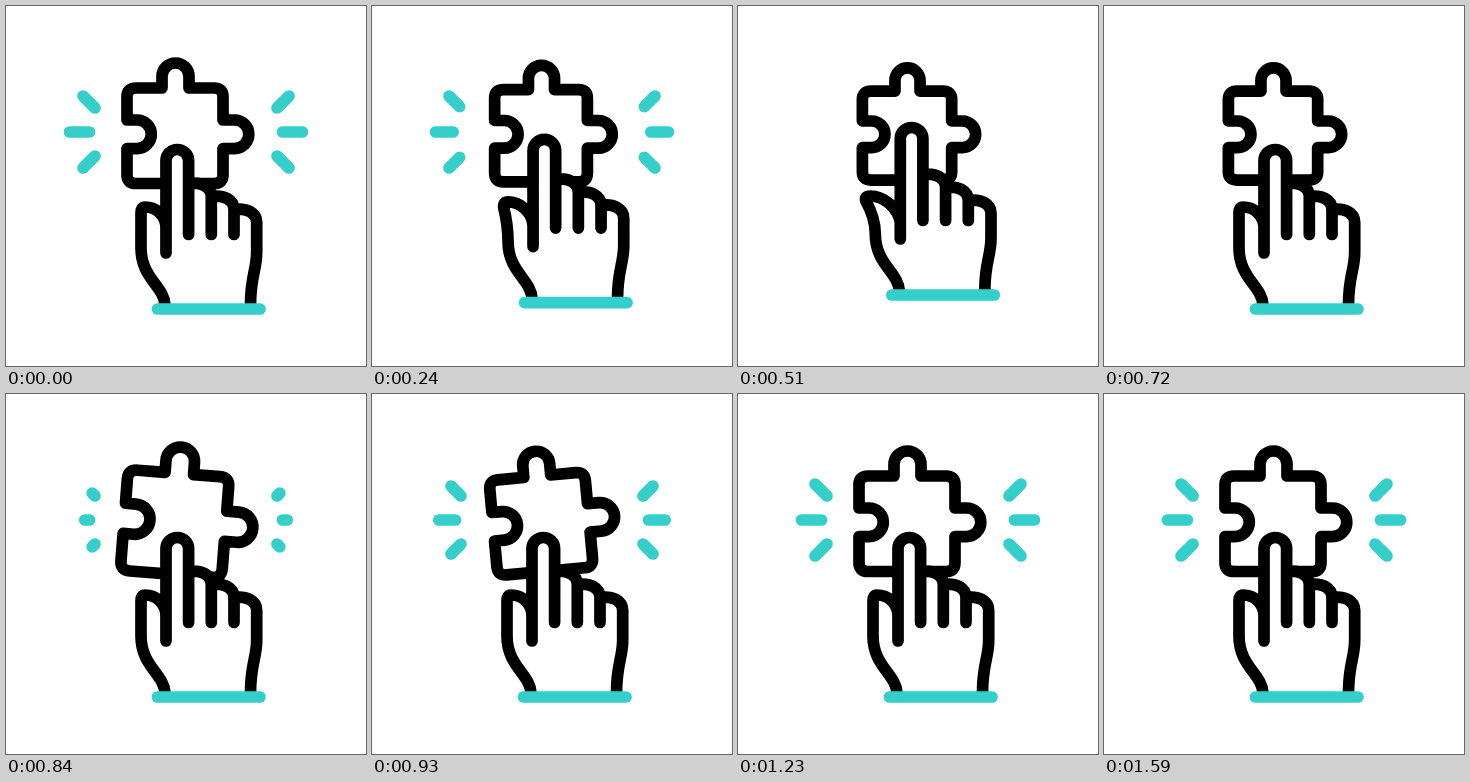
These frames come from a looping animation (360x360 px, 1.62 s). An HTML page:

```html
<!DOCTYPE html>
<html>
<head>
<meta charset="utf-8">
<style>
  html, body { margin: 0; width: 100%; height: 100%; overflow: hidden; background: #fff; }
  svg { display: block; width: 100vw; height: 100vh; }
  path { stroke: #000; stroke-width: 11.7; stroke-linecap: round; stroke-linejoin: round; fill: #fff; }
  .teal { stroke: #35cfcb; }
  #puzzle { vector-effect: non-scaling-stroke; }
</style>
</head>
<body>
<svg viewBox="0 0 360 360">
  <path id="rays" class="teal"/>
  <path id="puzzle" d="M121 91q0-9 9-9H156V70.5a13.5 13.5 0 0 1 27 0V82H208q9 0 9 9V114h11.5a14.3 14.3 0 0 1 0 28.6H217V168.5q0 9-9 9H130q-9 0-9-9V142.6h10a14.3 14.3 0 0 0 0-28.6H121Z"/>
  <g id="arm">
    <path id="hand"/>
    <path class="teal" d="M151.5 303H254"/>
  </g>
</svg>
<script>
const LOOP = 1620;
const el = id => document.getElementById(id);

// Smooth 0 to 1 between two times
function ramp(t, start, end) {
  const p = Math.min(1, Math.max(0, (t - start) / (end - start)));
  return (1 - Math.cos(Math.PI * p)) / 2;
}

// Outline from wrist over thumb, index and knuckles; p stretches the index and spreads the thumb
function handPath(p) {
  const knuckle = 177.5 + 5 * p, step = 22.7, thumb = 201 + 3 * p;
  let outline = `M159 299C158 280 135 272 135 242Q135 226 ${135 - 9.5 * p} ${207 + 2 * p}
    Q${135 - 11 * p} ${thumb} ${139 - 9 * p} ${thumb}
    C${150 - 7 * p} ${thumb} ${160 - 3 * p} ${209 + 6 * p} 160 ${222 + 8 * p}
    V${154.5 - 8 * p}a11.3 11 0 0 1 22.6 0V${knuckle}`;
  let creases = 'M160 222V247';
  for (let i = 0; i < 3; i++) {
    outline += `c12-2 ${step} 3 ${step} 13`;
    creases += `M${182.6 + i * step} ${knuckle + 13 * i}V228.5`;
  }
  return outline + 'V246C250.7 264 244.5 270 244.5 299' + creases;
}

function raysPath(inner, outer) {
  if (outer - inner < 0.01) return '';
  let d = '';
  for (const side of [-1, 1]) {
    for (const dir of [-1, 0, 1]) {
      const at = l => `${180 + side * (dir ? 91 + 12 * l : 96.5 + 20 * l)} ${126 + dir * (24 + 12 * l)}`;
      d += `M${at(inner)}L${at(outer)}`;
    }
  }
  return d;
}

function draw(t) {
  const press = ramp(t, 0, 510) - ramp(t, 540, 710);
  el('arm').setAttribute('transform', `translate(${2.3 * press} ${-14 * press})`);
  el('hand').setAttribute('d', handPath(press));

  const scale = 1 - 0.07 * ramp(t, 0, 490) + 0.13 * ramp(t, 720, 830) - 0.06 * ramp(t, 830, 930);
  const turn = 5 * ramp(t, 720, 825) - 10.3 * ramp(t, 825, 935) + 5.3 * ramp(t, 935, 1060);
  el('puzzle').setAttribute('transform',
    `translate(169.5 128) rotate(${turn}) scale(${scale}) translate(-169.5 -128)`);

  const hidden = t < 600;
  el('rays').setAttribute('d', hidden
    ? raysPath(ramp(t, 170, 490), 1)
    : raysPath(0, ramp(t, 770, 990)));
}

function tick() {
  draw(performance.now() % LOOP);
  requestAnimationFrame(tick);
}
tick();
</script>
</body>
</html>
```
